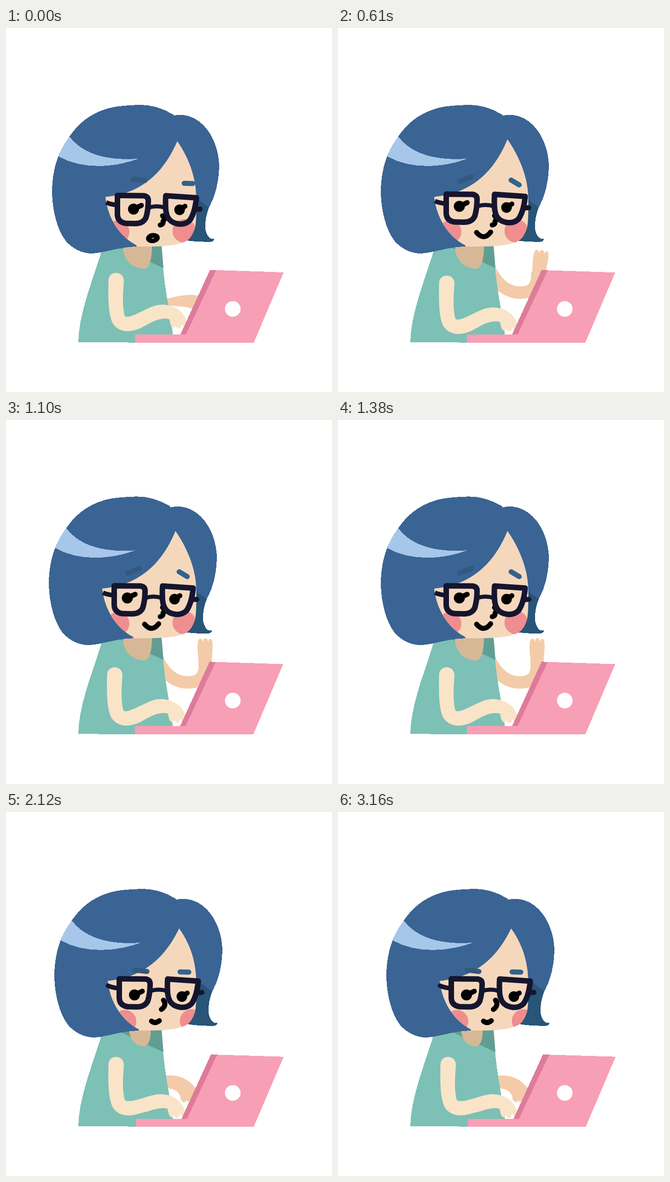
Animation, 708 px wide and 791 px high, one loop 3.29 s. Source, as an HTML page:

```html
<!DOCTYPE html>
<html lang="en">
<head>
<meta charset="utf-8">
<title>Girl at a laptop</title>
<style>
html, body { margin: 0; width: 100%; height: 100%; overflow: hidden; background: #fff; }
svg { display: block; width: 708px; height: 791px; }
</style>
</head>
<body>
<svg id="stage" viewBox="0 0 708 791"></svg>
<script>
const LOOP = 3290;
const stage = document.getElementById('stage');

// Start time of each step: wind-up, wave, typing.
const steps = [0, 70, 200, 330];
for (let t = 400; t <= 1660; t += 70) steps.push(t);
for (let t = 1730; t < LOOP; t += 130) steps.push(t);
const LAST_WAVE = steps.indexOf(1590);
const TYPING = steps.indexOf(1730);

const UPTURN = {
  neck: 'M254 474C254 508 278 524 303 523C313 518 317 498 317 474Z',
  nose: 'M340 408Q347 415 341 420Q342 427 335 428',
  cheeks: [243, 443, 387, 441]
};

const surprise = {
  ...UPTURN, hair: 0, lock: 0, part: [372, 246], glasses: [0, 0], eyes: [0, 0, 0, 0],
  brows: ['M275.5 328.5L301.5 331.5', 'M387 337.5L405.5 338'],
  mouth: 'open', arm: [0, 0], hand: [0, 0], laptop: [0, 0], back: 'rest'
};
const smile = {
  ...UPTURN, hair: -7, lock: -5, part: [368, 242], glasses: [-7, -3], eyes: [-13.5, -6, -11, -5],
  brows: ['M264.5 333.5L290 323', 'M376 330.5L393.5 341'],
  mouth: 'M301 444.5Q317 463 331.5 443.5', arm: [-3, 6], hand: [0, 0], laptop: [-1, .5], back: 'wave'
};
const typing = {
  hair: 5, lock: 7, part: [376, 253], glasses: [4, -1.5], eyes: [2, 4, 5, 6],
  neck: 'M267 474C270 498 283 510 302 509C311 504 315 492 314 474Z',
  nose: 'M342 409Q350 420 337.5 429', cheeks: [258, 455, 403, 454],
  brows: ['M280 343.5L306 346.5', 'M378 347.5L397 348'],
  mouth: 'M316 454.5Q324 461 333 453.5', arm: [0, 0], hand: [-4, 12], laptop: [2, 1.5], back: 'type'
};

const fill = (d, color) => `<path d="${d}" fill="${color}"/>`;
const line = (d, color, width, cap = 'round') =>
  `<path d="${d}" fill="none" stroke="${color}" stroke-width="${width}" stroke-linecap="${cap}" stroke-linejoin="round"/>`;
const circle = (x, y, r, color) => `<circle cx="${x}" cy="${y}" r="${r}" fill="${color}"/>`;
const move = (x, y, body) => `<g transform="translate(${x} ${y})">${body}</g>`;
const crisp = body => `<g shape-rendering="crispEdges">${body}</g>`;

function backArm(p) {
  const skin = '#f3cba9';
  if (p.back === 'rest')
    return fill('M340 590C368 584 392 576 420 582L410 613C395 604 370 605 340 602Z', skin);
  if (p.back === 'type')
    return move(0, p.tap || 0, fill('M340 574C370 569 396 576 416 606L408 618L396 630Q392 629 391 626Q388 635 383 629Q379 627 379 620C375 605 362 599 340 600Z', skin));
  const s = p.swing;
  const hand = 'M418 540C419 515 414 500 417 482Q420 472 426 478L428 484Q428 475 433.5 475Q439 476 439 484Q441 473 447 478Q450 487 448 505L446 540Z';
  return move(s, 4 * s + p.lift,
    line('M322 507C338 545 360 571 395 571C425 571 433 555 432 525', skin, 27, 'butt') +
    `<g transform="translate(${s} ${2 * s}) rotate(${7 * s} 425 540)">${fill(hand, skin)}</g>`);
}

function body(p) {
  return crisp(fill('M157 683C158 618 190 545 208 483L255 474L338 474C340 520 345 560 352 600Q359 640 365 684Z', '#7dc0b6')) +
    fill('M248 478L260 474L338 474L342 522Z', '#609e93') +
    fill(p.neck, '#d7b896');
}

function hair(p) {
  const tail = 'M405 345L440 380L441 390C435 405 432 420 433 437C436 453 443 461 452 457.5Q452 464 445 464.5C425 465 405 464 388 461L398 380Z';
  const lock = 'M350 195Q368 187 385 189C430 194 463 245 463 303C462 335 455 365 441 390L412 368L340 310Z';
  const main = 'M364 188.5C338 173 315 167 291 167C265 168 240 169 220 175C180 187 155 210 137 237C112 270 100 310 100 358C101 400 112 440 130 463C145 480 165 490 188 490C212 489 248 475 284 475L350 330L366 260Z';
  const shine = 'M138 236C165 272 215 289 287 284C235 304 165 308 114 279Q122.5 254.5 138 236Z';
  return crisp(move(p.lock, 0, fill(tail, '#285578') + fill(lock, '#3a6494')) +
    move(p.hair, 0, fill(main, '#3a6494') + fill(shine, '#a6c7ea')));
}

function glasses(p) {
  const ink = '#15152f';
  return move(...p.glasses,
    line('M242 364L299 364.5Q309 366 309 375C309 390 307 402 304 412Q298 425 280 425L260 424.5Q243 422 242 406Z', ink, 12) +
    line('M347 364.5L413.5 369C412 385 408 405 399 418Q390 427 376 426C358 424 349 415 347 395Q346 378 347 364.5Z', ink, 12) +
    line('M311 390Q327 385 344 390', ink, 9) +
    line('M217.5 379Q226 383 240 384.5', ink, 10, p.back === 'type' ? 'round' : 'butt') +
    line('M411 394L421.5 393.5', ink, 11));
}

function eyes([lx, ly, rx, ry]) {
  return move(lx, ly, circle(277, 393.5, 12, '#000') + line('M280 392L294 385.5', '#000', 11)) +
    move(rx, ry, circle(377, 395, 11.5, '#000') + line('M380 393L388.5 387.5', '#000', 11));
}

function mouth(shape) {
  if (shape !== 'open') return line(shape, '#000', 11);
  return '<ellipse cx="319" cy="456.5" rx="15" ry="11" transform="rotate(-8 319 456.5)"/>' +
    line('M317 457.5L321 456.5', '#d9c0aa', 1.5);
}

function face(p) {
  const [x, y] = p.part, h = p.hair;
  const shape = `M${x} ${y}C${x + 22} ${y + 31} 412 320 413 365C414 400 413 420 411 432C406 450 398 462 384 466C360 475 330 475 ${284 + h} 475L${283 + h} 472C${245 + h} 452 ${221 + h} 412 ${216 + h} 367C${290 + h} 360 ${x - 32} 320 ${x} ${y}Z`;
  const [lx, ly, rx, ry] = p.cheeks;
  return `<clipPath id="skin"><path d="${shape}"/></clipPath>` + fill(shape, '#f5d8bc') +
    `<g clip-path="url(#skin)">${circle(lx, ly, 25, '#f08d8f')}${circle(rx, ry, 25.5, '#f08d8f')}</g>` +
    line(p.brows[0], '#33597e', 11) + line(p.brows[1], '#33628c', 11) +
    line(p.nose, '#000', 11) + glasses(p) + eyes(p.eyes) + mouth(p.mouth);
}

function frontArm(p) {
  const [hx, hy] = p.hand;
  const at = (x, y) => `${x + hx} ${y + hy}`;
  return move(...p.arm, fill(
    `M222.5 550C222 526 256 526 256 550C254 575 252 605 258 626C268 634 300 ${610 + hy * .8} ${at(325, 603)}` +
    `C${at(348, 597)} ${at(377, 606)} ${at(388, 627)}Q${at(395, 638)} ${at(391, 648)}Q${at(386, 652)} ${at(381, 643)}` +
    `Q${at(382, 653)} ${at(375, 653)}Q${at(369, 653)} ${at(369, 645)}Q${at(368, 653)} ${at(362, 651)}` +
    `Q${at(357, 648)} ${at(355, 633)}C${at(335, 627)} ${at(315, 640)} 295 ${651 + hy * .2}` +
    'C270 663 245 662 232 642C221 620 222 580 222.5 550Z', '#f9e4c8'));
}

function laptop([x, y]) {
  const top = 525.5 + y, base = 665.5 + y, left = 280 + Math.max(x, 0), right = Math.min(x, 0);
  return crisp(
    fill(`M${left} ${base}L${380 + x} ${base}L${443 + x} ${top}L${603 + right} ${531 + y / 2}L${538 + right} 684L${left} 684Z`, '#f79fb5') +
    fill(`M${443 + x} ${top}L${456.5 + x} ${top + .5}L${391 + x} ${base}L${379 + x} ${base}Z`, '#de7b9b')) +
    circle(492.5, 610.5, 17, '#fff');
}

function poseAt(i) {
  if (i === 0 || i === TYPING - 1) return surprise;
  if (i < TYPING) {
    const swing = [1, 0, -1, 0][(i + 1) % 4];
    const lift = i === 1 || i === LAST_WAVE ? 40 : 0;
    return { ...smile, swing, lift, bob: swing ? 0 : -.7 };
  }
  if ((i - TYPING) % 2) return typing;
  return { ...typing, hair: 4, lock: 6, hand: [-1, 4], laptop: [0, 0], tap: 4 };
}

function draw(p) {
  stage.innerHTML = move(0, p.bob || 0,
    backArm(p) + body(p) + hair(p) + face(p) + frontArm(p) + laptop(p.laptop));
}

let shown = -1;
function tick() {
  const t = performance.now() % LOOP;
  const i = steps.filter(start => start <= t).length - 1;
  if (i !== shown) draw(poseAt(shown = i));
  requestAnimationFrame(tick);
}
tick();
</script>
</body>
</html>
```
